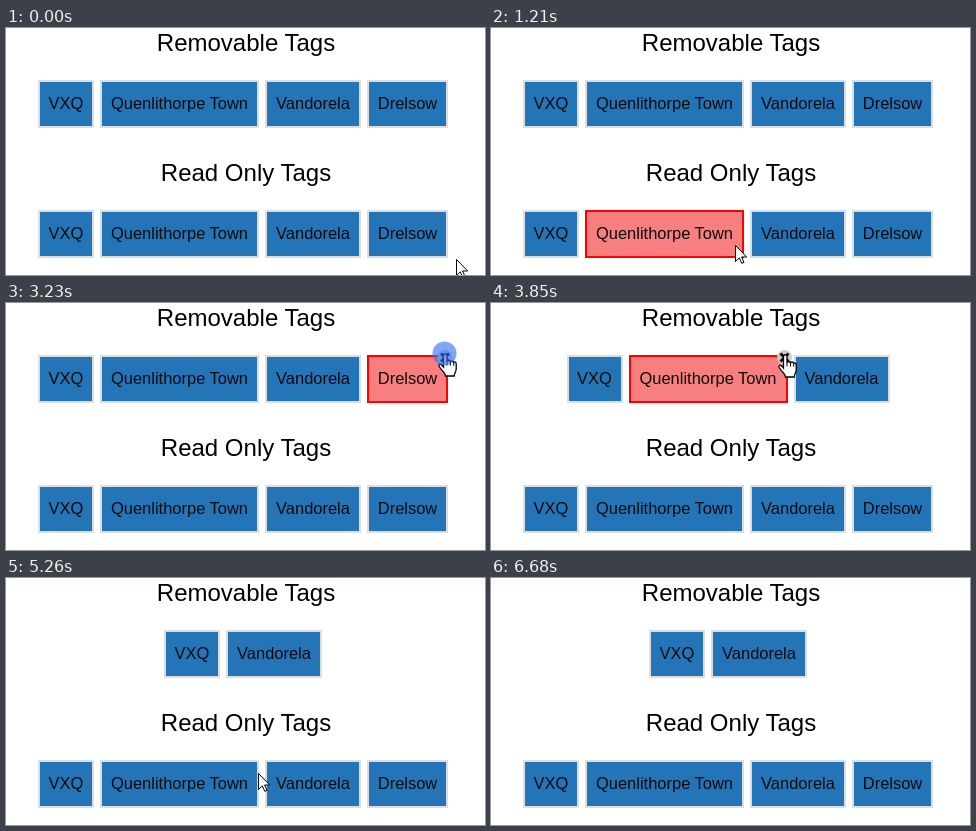
Write an HTML page that moves like this. It is 479 by 247 pixels and loops after 6880 ms.

```html
<!DOCTYPE html>
<html lang="en">
<head>
<meta charset="utf-8">
<title>Tags</title>
<style>
  html, body { margin: 0; width: 100%; height: 100%; overflow: hidden; background: #fff; }
  #stage { position: relative; width: 479px; height: 247px; overflow: hidden; color: #0a0a0a; font-family: "Liberation Sans", Arial, sans-serif; }
  #stage > * { position: absolute; box-sizing: border-box; }
  h1 { left: 0; width: 480px; margin: 0; font: 24px/30px "Liberation Sans", Arial, sans-serif; text-align: center; color: #000; }
  .tag {
    height: 48px; border: 2px solid #ddd; background: #2475b8;
    font-size: 16.48px; line-height: 43px; white-space: nowrap;
    display: flex; justify-content: center;
  }
  .tag.hover { background: #f77f7f; border-color: #f00; }
  svg { left: 0; top: 0; }
</style>
</head>
<body>
<div id="stage">
  <h1 style="top:0">Removable Tags</h1>
  <h1 style="top:130px">Read Only Tags</h1>
  <svg id="overlay" width="479" height="247">
    <g id="badge">
      <circle r="7.5" fill="#ccc"/>
      <path d="M-4-4 4 4M4-4-4 4" stroke="#000" stroke-width="2.6"/>
    </g>
    <path id="arrow" fill="#fff" stroke="#000" d="M.5.5V16.5L4.3 12.9 6.8 18.4 9 17.4 6.6 12H11.7Z"/>
    <g id="hand" fill="#fff" stroke="#000">
      <path stroke-width="1.3" d="M-.5 14V2.500a1.750 1.750 0 0 1 3.500 0V9q.2-1.500 1.700-1.500t1.800 1.700q.3-1.200 1.600-1.200t1.600 1.700q.3-1 1.200-.8 1.300.2 1.300 2V16c0 3-2 4-2 7H1.500c0-3-3.500-5-6.300-9.500-1-1.800 1-3 2.500-1.500Z"/>
      <path d="M3 8.500v4M6.500 9v3.500M9.700 9.700v3"/>
    </g>
    <circle id="press" r="12" fill="#3470f5" fill-opacity=".62"/>
  </svg>
</div>
<script>
const LOOP = 6880, TICKS = 34, TICK = LOOP / TICKS, LEAD = 17;
const GAP = 6, CENTER = 237, HEIGHT = 48;

// removed: tick at which the tag leaves the upper row
const tags = [
  { text: "VXQ", width: 56 },
  { text: "Quenlithorpe Town", width: 159, removed: 21 },
  { text: "Vandorela", width: 96 },
  { text: "Drelsow", width: 81, removed: 17 }
];

// pointer stops: tick, x, y
const stops = [
  [0, 450, 231], [4, 62, 206], [6, 244, 217], [8, 312, 81], [10, 62, 74],
  [11, 154, 74], [16, 438, 50], [17, 438, 50], [19, 293, 51], [21, 293, 51],
  [22, 274, 54], [24, 43, 180], [25, 66, 203], [26, 252, 195], [28, 270, 78],
  [30, 286, 229], [32, 441, 229], [33, 530, 260]
];

const $ = id => document.getElementById(id);
const stage = $("stage"), overlay = $("overlay");
const ease = u => u * u * (3 - 2 * u);

function pointer(tick) {
  const next = Math.max(1, stops.findIndex(s => s[0] >= tick));
  const [t0, x0, y0] = stops[next - 1], [t1, x1, y1] = stops[next];
  const k = ease((tick - t0) / (t1 - t0));
  return [x0 + (x1 - x0) * k, y0 + (y1 - y0) * k].map(Math.round);
}

function makeRow(top, removable) {
  return tags.map(({ text, width, removed }) => {
    const el = document.createElement("div");
    el.className = "tag";
    el.textContent = text;
    el.style.top = top + "px";
    el.style.width = width + "px";
    stage.insertBefore(el, overlay);
    return { el, width, top, removable, until: removable && removed || TICKS };
  });
}
const rows = [makeRow(52, true), makeRow(182, false)];

function layout(row, tick) {
  const shown = row.filter(tag => tick < tag.until);
  let x = CENTER - shown.reduce((sum, tag) => sum + tag.width + GAP, -GAP) / 2;
  for (const tag of row) tag.el.style.display = shown.includes(tag) ? "" : "none";
  for (const tag of shown) {
    tag.x = x;
    tag.el.style.left = x + "px";
    x += tag.width + GAP;
  }
  return shown;
}

function place(id, x, y, visible) {
  const el = $(id);
  el.setAttribute("transform", `translate(${x} ${y})`);
  el.style.display = visible ? "" : "none";
}

function draw(tick) {
  const [px, py] = pointer(tick);
  let target = null;
  for (const tag of rows.flatMap(row => layout(row, tick))) {
    const hit = px >= tag.x && px < tag.x + tag.width - 1 &&
      py >= tag.top - 2 && py < tag.top + HEIGHT;
    tag.el.classList.toggle("hover", hit);
    if (hit) target = tag;
  }
  const closable = !!target && target.removable;
  const bx = closable ? target.x + target.width - 3 : 0;
  const by = closable ? target.top + 2.5 : 0;
  const onBadge = closable && Math.hypot(px - bx, py - by) < 7.5;
  place("badge", bx, by, closable);
  place("arrow", px, py, !onBadge);
  place("hand", px, py, onBadge);
  place("press", px + .5, py + .5, onBadge && target.until === tick + 1);
}

let current = -1;
function frame() {
  const t = performance.now() % LOOP;
  const tick = Math.floor((t + LEAD) / TICK) % TICKS;
  if (tick !== current) draw(current = tick);
  requestAnimationFrame(frame);
}
frame();
</script>
</body>
</html>
```
